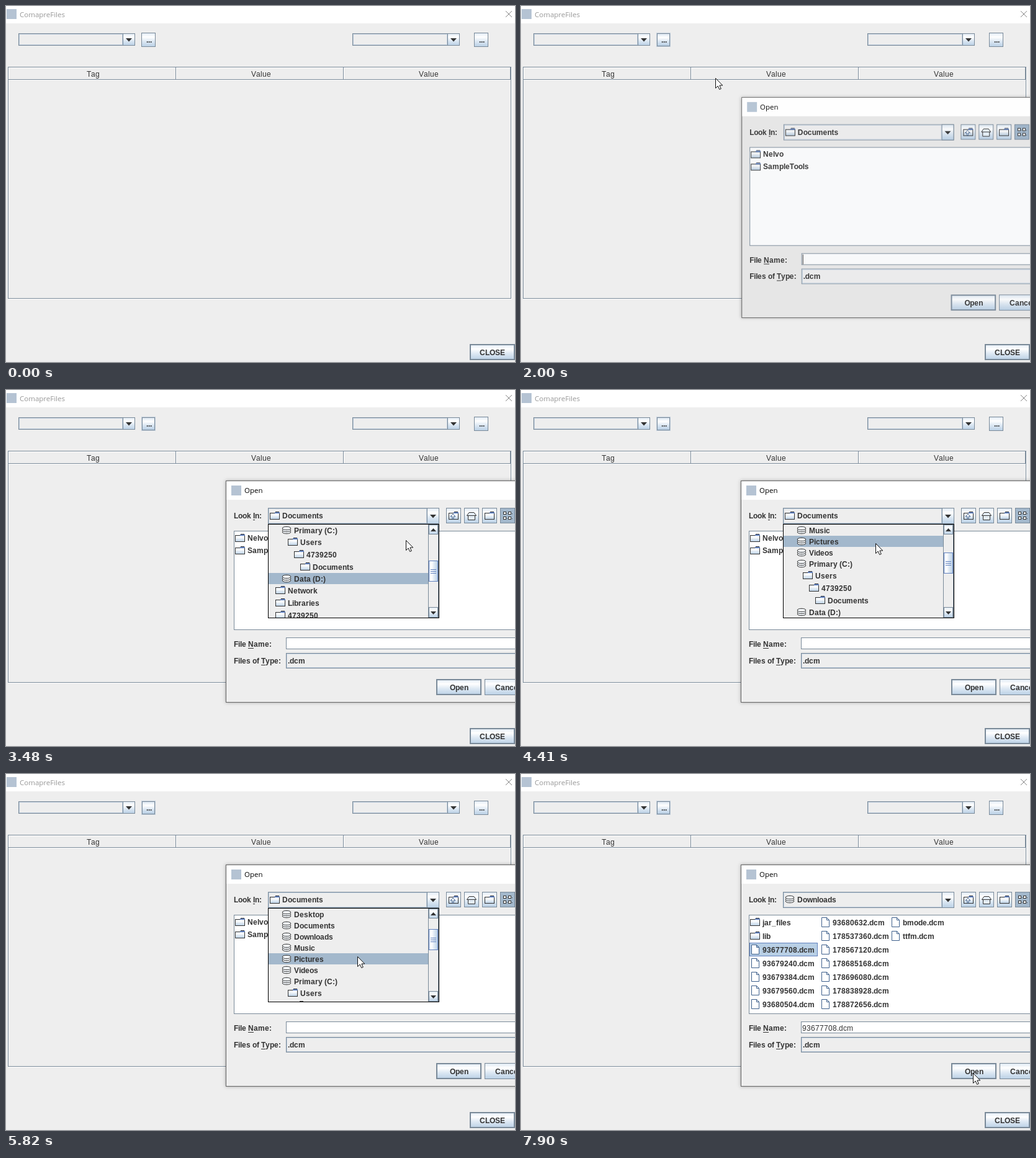
An HTML page with a canvas for the animation above (7.99 s loop, 820 by 574 pixels).

```html
<!DOCTYPE html>
<html lang="en">
<head>
<meta charset="utf-8">
<title>File dialog</title>
<style>
  html, body { margin: 0; width: 100%; height: 100%; overflow: hidden; background: #eee; }
  canvas { display: block; }
</style>
</head>
<body>
<canvas id="stage" width="820" height="574"></canvas>
<script>
const ctx = document.getElementById('stage').getContext('2d');
const LOOP = 7990;
const BORDER = '#7a8a99', PANEL = '#eee', INK = '#333', FOCUS = '#a3b8cc', PALE = '#b8cfe5', BLUE = '#6382bf';
const BOLD = 'bold 12px "Liberation Sans", Arial, sans-serif';
const PLAIN = '12px "Liberation Sans", Arial, sans-serif';
const CAPTION = '11.5px "Open Sans", "Noto Sans", sans-serif';

const OPEN_DIALOG = 1850, OPEN_POPUP = 3010, PICK_FOLDER = 6360, PICK_FILE = 7130;

// Pointer way points: time, x, y
const POINTER = [
  [70, 721, 546], [840, 200, 64], [910, 205, 64], [1230, 225, 50], [1850, 225, 50],
  [2000, 312, 116], [2610, 695, 206], [2700, 695, 206], [2870, 666, 203], [3330, 666, 203],
  [3440, 644, 242], [3790, 644, 242], [4110, 576, 275], [4260, 576, 275], [4410, 571, 247],
  [4640, 571, 247], [5420, 566, 344], [5750, 566, 344], [5820, 566, 294], [6050, 563, 265],
  [6200, 564, 265], [6830, 564, 265], [6980, 465, 279], [7130, 465, 279], [7600, 730, 519],
  [7900, 728, 482]
];
const CLICKS = [[1230, 1460], [3010, 3160], [6360, 6430], [7130, 7210]];

// Popup rows: indent level, name, drive?
const ROWS = [
  [2, 'Desktop', 1], [2, 'Documents', 1], [2, 'Downloads', 1], [2, 'Music', 1], [2, 'Pictures', 1],
  [2, 'Videos', 1], [2, 'Primary (C:)', 1], [3, 'Users'], [4, '4739250'], [5, 'Documents'],
  [2, 'Data (D:)', 1], [1, 'Network'], [1, 'Libraries'], [1, '4739250'], [1, 'Control Panel'],
  [1, 'Recycle Bin'], [1, 'Reports']
];
let rowTop = 0;
const LIST = ROWS.map(([level, name, drive]) => {
  const row = { level, name, drive, top: rowTop, height: drive ? 18 : 20 };
  rowTop += row.height;
  return row;
});
const FILES = [
  ['jar_files', 'lib', '93677708.dcm', '93679240.dcm', '93679384.dcm', '93679560.dcm', '93680504.dcm'],
  ['93680632.dcm', '178537360.dcm', '178567120.dcm', '178685168.dcm', '178696080.dcm', '178838928.dcm', '178872656.dcm'],
  ['bmode.dcm', 'ttfm.dcm']
];

const between = (t, a, b) => t >= a && t < b;

function fill(x, y, w, h, color) {
  ctx.fillStyle = color;
  ctx.fillRect(x, y, w, h);
}

function box(x, y, w, h, color, edge = BORDER, line = 1) {
  fill(x, y, w, h, edge);
  fill(x + line, y + line, w - 2 * line, h - 2 * line, color);
}

function path(d, x, y, stroke, inside) {
  const p = new Path2D(d);
  ctx.save();
  ctx.translate(x, y);
  if (inside) { ctx.fillStyle = inside; ctx.fill(p); }
  if (stroke) { ctx.strokeStyle = stroke; ctx.lineWidth = 1; ctx.stroke(p); }
  ctx.restore();
}

function gloss(x, y, w, h, sideways) {
  const g = sideways ? ctx.createLinearGradient(x, 0, x + w, 0) : ctx.createLinearGradient(0, y, 0, y + h);
  [[0, '#dde8f3'], [.3, '#fff'], [.6, '#dde8f3'], [1, PALE]].forEach(s => g.addColorStop(...s));
  return g;
}

// Letters advance by whole pixels, as hinted interface text does
const advance = c => Math.round(ctx.measureText(c).width);
const textWidth = s => [...s].reduce((sum, c) => sum + advance(c), 0);

function text(s, x, y, font = BOLD, mnemonic = -1) {
  ctx.font = font;
  ctx.fillStyle = INK;
  [...s].forEach((c, i) => {
    ctx.fillText(c, x, y);
    if (i === mnemonic) ctx.fillRect(x, y + 2, advance(c), 1);
    x += advance(c);
  });
}

function centered(s, x, y, font = BOLD) {
  ctx.font = font;
  text(s, Math.round(x - textWidth(s) / 2), y, font);
}

function caption(s, x, y, color) {
  ctx.font = CAPTION;
  ctx.fillStyle = color;
  ctx.fillText(s, x, y);
}

function button(x, y, w, h, label, line = 1) {
  box(x, y, w, h, gloss(x, y, w, h), BORDER, line);
  if (label) centered(label, x + w / 2, y + h / 2 + 5);
}

function combo(x, y, w, h, color = PANEL) {
  box(x, y, w, h, color);
  box(x + 1, y + 1, w - 21, h - 2, color, '#bccbdb');
  button(x + w - 20, y, 20, h);
  path('M0 0H10L5 5.5Z', x + w - 15, y + Math.round(h / 2) - 2, null, INK);
}

function folder(x, y) {
  box(x, y + 3, 16, 11, gloss(x, y + 3, 16, 11), INK);
  fill(x + 9, y + 1, 6, 1, INK);
  fill(x + 8, y + 2, 8, 2, BLUE);
}

function drive(x, y) {
  for (const dy of [11, 8, 5]) {
    ctx.beginPath();
    ctx.ellipse(x + 8, y + dy, 6.8, 2.7, 0, 0, 7);
    ctx.fillStyle = '#f4f8fc';
    ctx.strokeStyle = INK;
    ctx.lineWidth = 1;
    ctx.fill();
    ctx.stroke();
  }
}

function page(x, y) {
  path('M.5 .5H8.5L12.5 4.5V15.5H.5Z M8.5 .5V4.5H12.5', x, y, '#3f608c', '#fff');
}

function drawWindow(t) {
  const active = between(t, 1230, OPEN_DIALOG);
  fill(0, 0, 820, 574, PANEL);
  fill(0, 0, 820, 28, '#fff');
  fill(1, 5, 16, 16, '#b5c3d3');
  caption('ComapreFiles', 22, 18, active ? '#000' : '#999');
  path('M0 0L10 10M10 0L0 10', 805, 8, active ? '#000' : '#888');

  combo(20, 44, 188, 20);
  combo(558, 44, 173, 20);
  button(218, 43, 23, 23, '');
  if (t >= 1230) {
    box(218, 43, 23, 23, BORDER, '#c3d0dd');
    fill(220, 45, 19, 19, gloss(220, 45, 19, 19));
  }
  centered('...', 230, 59);
  button(754, 43, 23, 23, '');
  centered('...', 766, 59);

  box(4, 99, 811, 374, PANEL, '#fff');
  box(3, 98, 811, 374, PANEL);
  ['Tag', 'Value', 'Value'].forEach((name, i) => {
    const x = 4 + 270 * i;
    fill(x, 99, 269, 1, '#fff');
    fill(x, 99, 1, 19, '#fff');
    fill(x, 118, 269, 1, BORDER);
    fill(x + (i < 2 ? 269 : 268), 99, 1, 20, BORDER);
    centered(name, x + 136.5, 114, PLAIN);
  });
  fill(4, 119, 809, 1, '#fff');
  button(747, 545, 73, 26, 'CLOSE', 2);
}

function drawToolbar() {
  for (let i = 0; i < 4; i++) {
    const x = 709 + 29 * i;
    box(x, 190, 24, 25, i === 3 ? FOCUS : gloss(x, 190, 24, 25));
  }
  folder(713, 195);
  path('M4 12V8H1L5 4L9 8H6V12Z', 715, 196, '#3f608c', '#fff');
  path('M2.5 7V14.5H13.5V7M.5 7.5L4 2.5H12L15.5 7.5Z', 742, 195, INK, '#e4edf6');
  folder(771, 195);
  for (const [x, y] of [[801, 196], [809, 196], [801, 204], [809, 204]]) {
    box(x, y, 5, 5, '#fff', INK);
    fill(x + 6, y + 3, 1, 1, INK);
  }
}

function drawFiles(t) {
  box(367, 227, 500, 160, '#fff');
  if (t < PICK_FOLDER + 70) {
    ['Nelvo', 'SampleTools'].forEach((name, i) => {
      folder(369, 231 + 20 * i);
      text(name, 389, 243 + 20 * i);
    });
    return;
  }
  if (t >= PICK_FILE) box(368, 272, 110, 22, PALE, BLUE);
  FILES.forEach((names, col) => names.forEach((name, row) => {
    const x = 371 + 113 * col, y = 231 + 22 * row;
    name.includes('.') ? page(x, y) : folder(x - 2, y);
    text(name, x + 18, y + 13);
  }));
}

function drawDialog(t) {
  const u = Math.min(1, (t - OPEN_DIALOG) / 240), ease = 1 - (1 - u) ** 3;
  const scale = .9 + .1 * ease;
  ctx.save();
  ctx.globalAlpha = ease;
  ctx.translate(600, 325);
  ctx.scale(scale, scale);
  ctx.translate(-600, -325);

  ctx.save();
  ctx.shadowColor = 'rgba(0,0,0,.35)';
  ctx.shadowBlur = 5;
  fill(354, 146, 510, 358, '#666');
  ctx.restore();
  fill(355, 147, 508, 356, PANEL);
  fill(355, 147, 508, 30, '#fff');
  fill(363, 154, 16, 16, '#b5c3d3');
  caption('Open', 384, 166, '#000');

  text('Look In:', 367, 207, BOLD, 5);
  const moved = t >= PICK_FOLDER;
  combo(422, 190, 276, 26, moved && t < PICK_FILE ? FOCUS : PANEL);
  moved ? drive(425, 194) : folder(425, 195);
  text(moved ? 'Downloads' : 'Documents', 445, 207);
  drawToolbar();
  drawFiles(t);

  text('File Name:', 367, 414, BOLD, 5);
  box(451, 399, 400, 19, '#fff');
  if (t >= PICK_FILE) text('93677708.dcm', 453, 414, PLAIN);
  if (between(t, 1930, 2400) || between(t, 2870, OPEN_POPUP)) fill(453, 401, 1, 16, INK);
  text('Files of Type:', 367, 441, BOLD, 9);
  combo(451, 424, 400, 25);
  text('.dcm', 454, 441);
  button(693, 466, 73, 26, 'Open', 2);
  button(771, 466, 73, 26, 'Cancel');
  ctx.restore();
}

function drawPopup(t, pointerY) {
  const first = t < 3440 ? 9 : t < 3560 ? 6 : t < 4640 ? 3 : 0;
  const scroll = LIST[first].top;
  box(422, 216, 276, 152, PANEL, '#000');

  ctx.save();
  ctx.beginPath();
  ctx.rect(423, 217, 257, 150);
  ctx.clip();
  LIST.forEach((row, i) => {
    const y = 217 + row.top - scroll, x = 424 + 10 * row.level;
    const hovered = t < 3410 ? i === 9 : t < 3790 ? i === 10 : between(pointerY, y, y + row.height);
    if (hovered) fill(423, y, 257, row.height, FOCUS);
    row.drive ? drive(x, y + 1) : folder(x, y + 2);
    text(row.name, x + 20, y + (row.drive ? 14 : 15));
  });
  ctx.restore();

  box(680, 217, 17, 150, PANEL);
  button(681, 217, 15, 16);
  button(681, 350, 15, 17);
  path('M0 5H9L4.5 0Z', 684, 223, null, INK);
  path('M0 0H9L4.5 5Z', 684, 357, null, INK);
  const thumb = Math.round(249.6 + scroll * .235);
  box(681, thumb, 15, 34, gloss(681, thumb, 15, 34, true), BLUE);
  for (const dy of [14, 17, 20]) fill(684, thumb + dy, 9, 1, BLUE);
}

function pointerAt(t) {
  const i = POINTER.findIndex(p => p[0] > t);
  if (i < 0) return POINTER[POINTER.length - 1].slice(1);
  const [t0, x0, y0] = POINTER[i - 1], [t1, x1, y1] = POINTER[i];
  const u = (t - t0) / (t1 - t0);
  return [Math.round(x0 + (x1 - x0) * u), Math.round(y0 + (y1 - y0) * u)];
}

function drawPointer(t, x, y) {
  if (CLICKS.some(([a, b]) => between(t, a, b))) {
    ctx.beginPath();
    ctx.arc(x, y, 12, 0, 7);
    ctx.fillStyle = 'rgba(255,255,0,.47)';
    ctx.fill();
  }
  path('M.5 .5V16.5L4.2 13L6.7 18.5L9.3 17.4L6.9 12H11.8Z', x, y, '#111', '#fff');
}

function draw(t) {
  drawWindow(t);
  if (t >= OPEN_DIALOG) drawDialog(t);
  if (t < POINTER[0][0]) return;
  const [x, y] = pointerAt(t);
  if (between(t, OPEN_POPUP, PICK_FOLDER)) drawPopup(t, y);
  drawPointer(t, x, y);
}

const start = performance.now();
function tick() {
  draw((performance.now() - start) % LOOP);
  requestAnimationFrame(tick);
}
tick();
</script>
</body>
</html>
```
